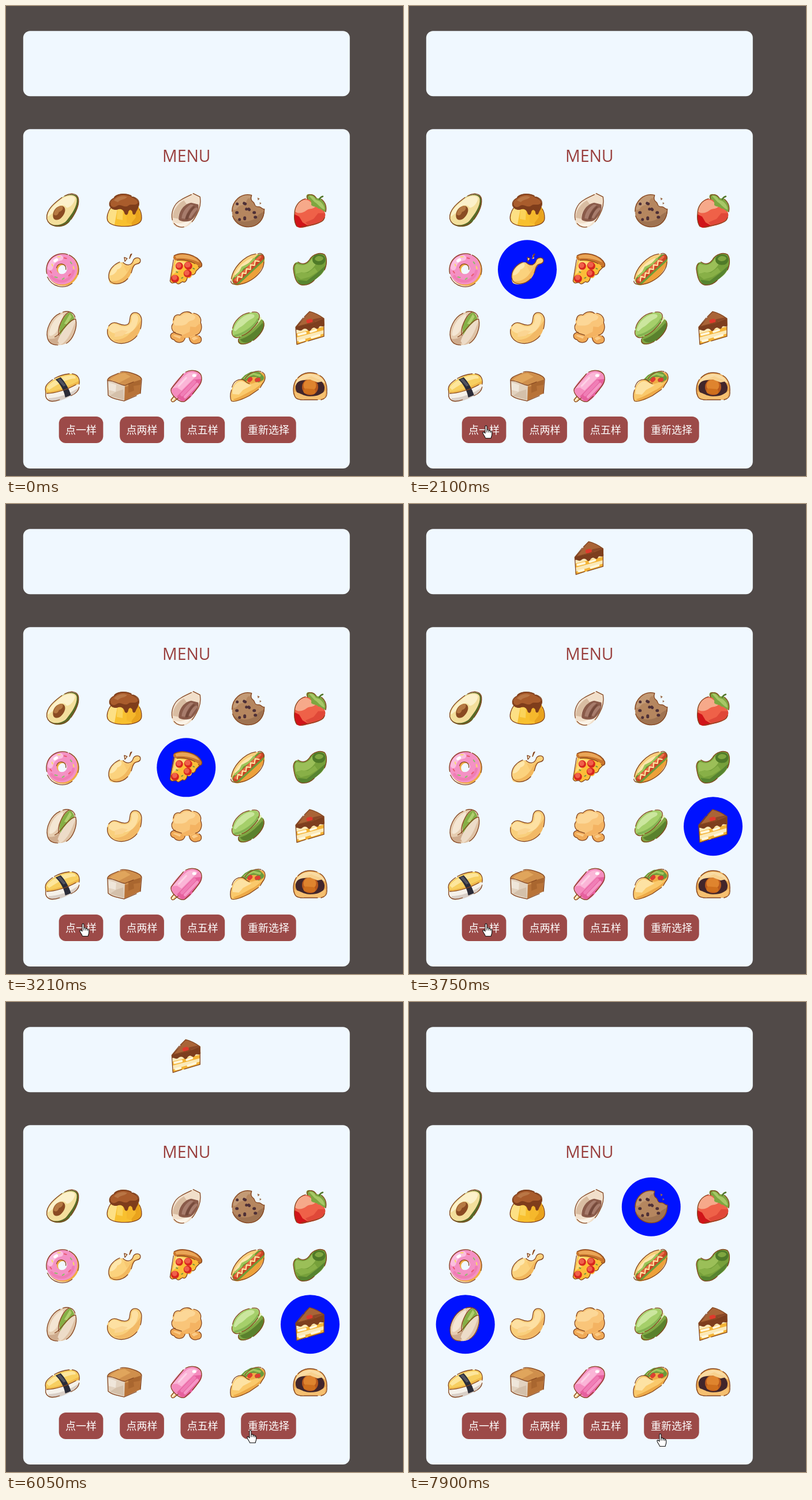
These frames come from a looping animation (688 by 814 pixels, 8 s). An HTML page:

```html
<!DOCTYPE html>
<html lang="zh-CN">
<head>
<meta charset="utf-8">
<title>Menu</title>
<style>
html, body { margin: 0; width: 100%; height: 100%; overflow: hidden; background: #514a48; }
svg { display: block; }
text { text-anchor: middle; }
.title { font: 28.4px "Open Sans", "Noto Sans", sans-serif; fill: #993f3d; }
.label { font: 18px "Noto Sans CJK SC", "Noto Sans CJK", sans-serif; fill: #fff; }
</style>
</head>
<body>
<svg id="stage" width="688" height="814" viewBox="0 0 688 814">
  <g fill="#f0f8ff">
    <rect x="29.8" y="43.2" width="566" height="113" rx="12"/>
    <rect x="29.8" y="213.2" width="566" height="587.8" rx="12"/>
  </g>
  <text class="title" x="312.8" y="270">MENU</text>
</svg>
<script>
// Shapes per dish, joined by "|": "fill path", "stroke:width path", or "o path" for the brown outline.
const DISHES = [
  // avocado
  `586b27 M-27 14C-30 -2 -12 -14 -2 -22C8 -30 26 -32 28 -20C30 -6 20 8 13 18C4 31 -22 32 -27 14Z
  |f3df9c M-27 13C-29 -1 -13 -13 -3 -21C7 -29 24 -30 25 -20C26 -8 16 6 8 16C0 27 -23 29 -27 13Z
  |fcf1cb M-25 10C-26 0 -12 -12 -2 -20C8 -27 21 -27 22 -21C20 -10 8 -2 6 -7C0 -14 -14 -6 -17 4Z
  |8a4b22 M-16 11C-18 0 -8 -11 1 -8C8 -4 4 6 -1 11C-7 18 -15 17 -16 11Z
  |b67942 M-15 6C-14 -3 -6 -10 0 -8C3 -3 -2 1 -6 2C-7 7 -12 10 -15 6Z
  |o M-1 -23C-12 -15 -29 -2 -27 14C-23 29 -2 30 10 20M4 -26C11 -30 26 -33 28 -20C29 -9 22 5 15 15`,
  // pudding
  `f8c02f M-22 -8C-28 0 -31 9 -29 17C-26 24 -12 27 1 27C15 27 30 22 30 13C30 6 28 -2 24 -8Z
  |fde085 M-23 -6C-28 1 -30 9 -28 16C-26 21 -22 23 -17 24L-12 -3Z
  |fbd35a M-12 -3L-13 14L-3 16L-2 -2Z
  |e9a31d M10 0L13 26C24 24 31 20 30 12L24 -7Z|f5b82c M4 0L4 20L11 23L20 11L18 0Z
  |7f3d1b M-25 -9C-26 -17 -21 -20 -17 -24C-10 -31 6 -31 13 -25C21 -22 26 -18 25 -10C25 -4 22 -2 20 3C18 9 14 7 14 2C12 -3 8 -2 7 2C6 9 1 8 0 3C-2 -3 -8 -4 -12 -2C-18 -1 -24 -3 -25 -9Z
  |a95c2c M-24 -11C-24 -18 -20 -20 -15 -23C-9 -29 5 -29 12 -24C18 -21 25 -18 23 -13C18 -8 12 -13 7 -9C0 -4 -6 -13 -12 -9C-17 -5 -22 -6 -24 -11Z
  |b97645 M-18 -18C-12 -26 0 -27 5 -24C2 -19 -8 -20 -11 -15Z
  |o M-20 -21C-28 -16 -26 -8 -23 -6C-29 2 -31 11 -29 17C-25 25 -12 27 1 27C17 27 30 22 30 13C30 7 29 1 26 -3M-17 -24C-10 -31 4 -30 12 -26M15 -24C22 -22 27 -18 25 -9`,
  // brazil nut
  `f1dfca M-24 17C-26 4 -22 -10 -8 -19C2 -24 4 -28 12 -30L24 -24C26 -14 22 2 17 9C10 22 2 29 -7 29C-18 30 -23 25 -24 17Z
  |d9bda2 M-23 12C-24 0 -14 -13 -4 -18L2 -10C-8 -6 -15 4 -13 14Z
  |fbf3e7 M-20 20C-14 24 0 22 12 10C8 20 0 28 -7 28C-14 28 -19 25 -20 20Z
  |8a5b4a M-13 15C-14 0 -2 -13 9 -14L21 -11C23 -2 17 10 9 16C3 20 -11 19 -13 15Z
  |a77c6c M-8 13C-7 2 0 -7 8 -11L13 -10C5 -4 0 5 -2 14ZM4 12C7 3 11 -3 18 -6L20 -3C15 2 11 8 8 13Z
  |74493b M-2 15C0 6 6 -2 13 -8L15 -7C9 0 5 7 3 15Z
  |o M9 -28C-2 -23 -4 -22 -9 -19C-22 -12 -27 4 -24 16M-21 22C-16 28 -8 29 -4 28M12 -30L24 -24C26 -13 23 -2 18 7C15 12 14 15 10 19`,
  // cookie
  `b5865f M6 -27C-12 -32 -29 -17 -28 2C-28 18 -14 28 1 28C17 27 28 15 28 -3C24 -2 23 -8 17 -7C10 -7 12 -13 9 -15C4 -18 5 -24 6 -27Z
  |c39a75 M-4 -27C-18 -24 -26 -12 -26 -2C-18 0 -20 -9 -10 -10C0 -10 -6 -22 3 -22L5 -27Z
  |9f7351 M-25 11C-13 23 8 19 15 10C19 4 25 4 28 0C28 16 17 28 1 28C-11 28 -21 22 -25 11Z
  |4e3037:5 M-19 -12h0M-7 -13l2 1M1 -3l1 1M-20 3h1M-6 12l0 2M12 11h1M-15 15h0M10 3h1M-3 -3h0
  |9a6a48 M16 -23l4 2l-3 3zM20 -15l3 2l-3 2z|o M6 -27C-12 -32 -28 -17 -28 1M-27 9C-22 24 -8 28 1 28C17 27 28 15 28 -3C23 -2 23 -8 17 -7C10 -7 12 -13 9 -15C4 -18 5 -24 6 -27`,
  // strawberry
  `ef6148 M-27 5C-27 -9 -17 -23 -3 -20C8 -18 24 -9 26 5C28 16 18 22 5 25C-5 27 -17 32 -23 27C-28 20 -27 12 -27 5Z
  |f6a98a M-26 1C-25 -12 -14 -22 -3 -18L10 -9C7 -2 -1 -5 -6 -1C-12 4 -21 6 -26 1Z
  |d01419 M-27 6L-19 10L-13 20L-3 26C-12 29 -18 31 -23 27C-27 21 -28 13 -27 6Z
  |e04838 M-3 26L-8 20L6 14L14 4L26 4C28 16 18 22 0 26Z
  |7ea640 M-5 -20C-8 -26 -6 -29 -2 -29C6 -29 9 -26 11 -22L19 -21C26 -15 29 -6 27 2C22 1 20 -4 14 -4C12 -8 6 -6 2 -10C3 -16 0 -20 -5 -20Z
  |a7c766 M-2 -26C4 -27 7 -24 10 -19L16 -17C22 -13 25 -8 25 -2C17 -5 13 -13 8 -15Z|52762b:2.5 M16 -20Q18 -24 22 -25
  |o M-8 -21C-20 -18 -27 -7 -27 5C-28 14 -27 21 -23 27M-15 28C-7 27 0 25 9 23C17 20 23 19 25 12M-4 -20C-9 -30 6 -31 11 -22M20 -20C27 -14 29 -6 27 2`,
  // donut
  `f1ac43:19 M-17 1a18 18 0 1 0 36 0a18 18 0 1 0 -36 0|f491c4:18 M-19 -1a18 18 0 1 0 36 0a18 18 0 1 0 -36 0
  |fbbfdf:9 M-21 -3Q-18 -18 -3 -20|f07db5:5 M-19 12Q-9 24 6 19Q17 14 19 3|fff:5 M-13 -15l3 -2
  |e95a70:2 M3 -20l4 1M-21 3l2 3M11 11l3 -3|8cc06a:2 M14 -13l2 3M-13 13l4 1M0 17l3 -2|f7dc65:2 M19 -5l1 4M-8 -22l4 0M-18 -9l1 3
  |o M9 -26A28 28 0 0 0 -27 7M-26 13A28 28 0 0 0 17 24M12 -25A28 28 0 0 1 27 9M-10 -3a8 8 0 1 1 16 3`,
  // drumstick
  `fbd27d M-27 15C-28 2 -18 -8 -8 -12C-3 -14 1 -10 5 -7C11 -6 14 -10 16 -17C19 -22 28 -21 28 -15C28 -10 22 -10 18 -8C14 -5 14 4 9 12C2 24 -14 28 -22 25C-26 24 -27 20 -27 15Z
  |fee7ad M-25 10C-23 -2 -14 -9 -6 -11C-2 -6 -7 -1 -12 0C-14 6 -20 11 -25 10Z
  |f2b85e M-23 20C-9 22 1 13 6 4C11 -4 14 -9 24 -12C14 -6 14 4 9 12C1 24 -18 28 -23 20Z
  |f8c870 M-1 -7L9 -7L15 -13L18 -11C10 -5 9 1 4 4Z
  |fff0d0 M0 -21l5 2l-4 5zM10 -26l2 7l-4 1z
  |o M-8 -13C-20 -8 -28 2 -27 14C-25 28 -5 28 6 16M0 -21l5 2l-4 5zM11 -26l2 -1l-4 8zM-2 -12C4 -6 13 -6 16 -17C20 -22 28 -21 28 -15C28 -10 22 -10 18 -8C14 -4 14 1 12 6`,
  // pizza
  `fbbd38 M-20 -18L-28 20C-25 27 -21 21 -17 23C-13 28 -11 23 -6 21C-3 24 1 20 2 14C5 17 10 14 10 9C14 11 17 6 17 3L25 -6C15 -15 -4 -20 -20 -18Z
  |fdd978 M-18 -16L-24 9L-12 1L-4 -8L6 -12Z
  |c9752c M-21 -24C-8 -32 20 -26 27 -10C29 -6 26 -2 22 -5C14 -14 -4 -18 -17 -16C-22 -16 -24 -21 -21 -24Z
  |eaa657 M-19 -23C-8 -29 16 -25 23 -12C14 -16 0 -21 -17 -19Z
  |d8251f:13 M-12 -6h0M3 -7l1 1M-20 16l1 0M2 7l1 0|f0604a:9 M-13 -7h0M2 -8l1 0M-20 14h0M1 6h0
  |72963b:2 M-17 4l2 1M12 -2l2 1M-8 15l2 -1
  |o M-22 -17L-28 20C-25 27 -21 21 -17 23C-13 28 -11 23 -6 21C-3 24 1 20 2 14M-21 -24C-8 -32 20 -26 27 -10C28 -5 25 -2 21 -5M23 -3L17 3C16 8 13 10 10 9M-16 -16C-5 -18 9 -14 15 -10`,
  // hot dog
  `eda13a:17 M-19 19Q8 15 20 -14|f9cf7c:16 M-22 15Q-12 -13 15 -19|fde6ac:5 M-21 8Q-11 -10 6 -17
  |6e9c37:15 M-20 19L21 -19|9cc458:4 M-22 12L-14 5L-10 -3L2 -9L10 -18|ca4526:9 M-22 20L23 -21|ea6e46:4 M-22 18L21 -22
  |fdeaa6:2 M-19 20L-18 12L-11 14L-10 6L-4 7L-3 -1L4 0L4 -8L11 -7L12 -15L19 -14
  |o M-29 16C-27 -1 -8 -24 13 -27M17 -27C23 -30 29 -24 27 -18M-27 25C-4 31 29 6 27 -13M-30 20Q-30 24 -26 25`,
  // green bean
  `76a03a M-29 -2C-29 -11 -24 -15 -18 -11C-12 -8 -6 -10 -1 -17C5 -27 17 -30 25 -26C31 -20 29 -7 25 1C21 9 13 14 7 19C0 27 -10 28 -18 26C-26 22 -28 9 -29 -2Z
  |9bbf58 M-26 -2C-26 -11 -22 -10 -17 -8C-8 -6 -1 -11 3 -19L10 -10C5 0 -6 8 -15 5L-25 8Z
  |88b047 M-15 5L-4 6L8 -3L13 4L-1 13L-16 17L-26 9Z|578430 M-22 18L-6 20L11 7L27 -7C25 3 16 12 7 19C0 27 -10 28 -18 26Z
  |4f7a28 M4 -17C4 -25 14 -28 21 -25C30 -21 27 -9 18 -8C9 -7 4 -11 4 -17Z|7fa63f M8 -18C10 -24 19 -25 23 -20C23 -14 11 -12 8 -18Z
  |o M-25 -10C-29 -8 -29 -4 -29 -1C-27 15 -24 25 -14 27C-5 28 2 24 7 19M-21 -13C-12 -7 -6 -10 -1 -17C5 -27 17 -30 25 -26C30 -20 29 -7 25 1`,
  // pistachio
  `e6cdb1 M-26 16C-29 -3 -14 -25 3 -29C13 -31 24 -23 24 -10C25 7 16 29 -6 29C-17 29 -25 25 -26 16Z
  |f4e6d3 M-23 12C-23 -2 -13 -20 1 -25C3 -15 -7 -9 -8 1C-9 7 -19 16 -23 12Z
  |cfac8e M-25 18C-10 21 -2 9 -3 0L5 9C0 20 -4 25 -12 29C-20 28 -24 24 -25 18Z
  |85af45 M-3 12C-10 -4 4 -24 13 -28C18 -25 20 -20 21 -16C12 -11 4 2 -3 12Z|b0cf6e M3 -8L13 -25L16 -20L8 -7Z
  |eddcc8 M-8 22C-4 8 11 -12 23 -15C27 -1 17 27 -4 29Z|dec2a5 M1 26C13 16 18 -1 23 -13C27 3 17 27 -4 29Z
  |o M-4 -26C-20 -19 -29 2 -26 16C-24 26 -16 29 -8 29M-13 15C-3 12 9 -15 23 -16C27 -1 18 20 7 26M1 -28C9 -31 20 -28 22 -19M-6 12C-9 1 0 -22 11 -28`,
  // cashew
  `f9cf7c M-30 7C-31 -6 -20 -13 -10 -8C-3 -5 5 -4 8 -9C11 -16 8 -22 14 -26C22 -30 29 -24 30 -15C30 -3 27 6 22 13C12 26 -4 28 -16 24C-25 21 -29 14 -30 7Z
  |fde0a2 M-27 3C-26 -8 -18 -9 -11 -6C1 1 11 -4 13 -14C13 -20 12 -23 18 -24C25 -24 25 -16 23 -11C20 2 10 11 -3 10C-10 6 -17 13 -27 3Z
  |f2b966 M-19 20C-6 20 3 17 11 7C22 0 26 -12 30 -14C30 -3 27 6 22 13C12 26 -9 27 -19 20Z
  |fbd592 M-16 7L-4 3L6 5L-3 13L-17 15Z
  |o M-29 2C-31 13 -24 22 -14 25C0 29 14 23 22 13M-27 -4C-22 -11 -16 -11 -10 -8C-3 -5 5 -4 8 -9C11 -16 8 -22 14 -26C22 -30 29 -24 30 -15C30 -9 30 -5 28 1`,
  // popcorn
  `f0aa57 M-20 7C-29 8 -29 18 -21 20C-16 27 -4 26 -2 17L5 16C6 24 12 29 20 26C28 25 28 16 22 13L0 2Z
  |f9c579 M-14 10C-24 8 -28 -2 -23 -8C-26 -17 -18 -25 -11 -23C-5 -30 5 -30 9 -26C19 -28 28 -18 25 -10C30 0 25 11 15 12C8 17 -2 19 -6 13C-9 13 -12 12 -14 10Z
  |fcd797 M-20 -5C-24 -14 -17 -22 -9 -21C-3 -28 12 -26 16 -20C14 -11 7 -16 2 -9C-4 -3 -15 -5 -20 -5Z
  |f4b362 M-7 12L6 6L7 -3L16 -2L24 -9C29 1 24 10 15 11C8 16 -2 18 -7 12Z
  |fbcb87 M-23 13C-20 10 -15 13 -9 14L-11 18ZM9 17L15 14L21 17L13 21Z
  |o M-23 -8C-28 -1 -24 8 -14 10L-8 12M-22 -14C-22 -21 -17 -25 -11 -23C-5 -30 5 -30 9 -26M13 -26C22 -25 27 -17 25 -10C29 0 25 10 16 12M-19 7C-30 8 -29 18 -21 20C-16 27 -4 26 -2 17M5 16C6 24 12 29 20 26C28 25 28 16 22 13`,
  // macaron
  `7ea743 M-17 19C-16 10 8 -1 18 -15C27 -18 30 -9 27 -1C22 14 4 26 -8 28C-16 29 -19 24 -17 19Z|5a812d M-14 19C2 15 17 0 25 -10C30 0 21 12 11 19C2 25 -9 28 -14 19Z
  |e6efb7:6 M-21 13Q4 6 20 -17
  |a5cf6a M-28 7C-29 -6 -14 -24 2 -27C14 -30 22 -25 18 -15C12 0 -9 16 -20 16C-26 16 -28 12 -28 7Z
  |cbe69e M-25 3C-22 -11 -10 -21 0 -24C10 -27 15 -21 7 -17C-4 -12 -8 -4 -14 -2C-20 2 -22 8 -25 3Z
  |84b352:4 M-23 13C-8 11 11 -3 17 -15
  |o M-27 0C-25 -12 -12 -25 2 -27M7 -28C18 -30 22 -23 18 -15M-28 4C-30 16 -20 18 -14 15M-17 19C-18 29 -6 29 5 23M9 21C21 12 31 -2 26 -12M-11 13C0 9 12 -3 17 -11`,
  // cake
  `fbe9b8 M-24 -1L24 -15L24 14L-23 28Z|f4b437 M-24 9L24 -3L24 3L-24 16ZM-24 23L24 9V14L-23 28Z
  |fff7dc:4 M-20 11L-8 8M1 6L10 3M-18 22L-10 20M3 16L16 12
  |7d3e1e M-25 -2L-1 -29C8 -26 17 -22 24 -17L25 -5C22 -1 19 -5 16 -3C13 5 9 -2 6 -1C2 -1 1 7 -3 4C-7 -1 -11 0 -14 3C-18 6 -21 1 -25 3Z
  |a96437 M-22 -3L-1 -29C8 -26 17 -22 24 -17L4 -9Z|8a4928 M6 -16L21 -19L24 -17L2 -9L-6 -7Z|df3a2c:7 M-3 -12l4 -1
  |o M-12 -18L-25 -2L-23 28L-8 23M-3 22L24 14V-17C17 -22 8 -27 -1 -29L-10 -20M-22 -3L8 -11`,
  // egg sushi
  `f5f1ea M-29 12C-30 6 0 -10 29 -8C32 -1 29 6 21 11C9 20 -13 27 -24 24C-29 21 -30 16 -29 12Z
  |d9cfc7 M-24 19C-5 19 18 9 29 0C30 6 22 12 15 15C2 23 -17 28 -24 24Z
  |f7cf60 M-30 4C-30 -5 -8 -21 12 -23C26 -24 31 -13 29 -7C17 1 -12 12 -26 11C-29 10 -30 8 -30 4Z
  |fde69c M-27 1C-22 -8 -4 -19 13 -20C20 -21 24 -18 23 -15C8 -15 -13 -2 -23 5Z|efb84a M-27 8C-9 8 11 -2 29 -11V-6C13 2 -13 12 -27 10Z
  |2b2c38 M-12 -13L-3 -17C5 -9 12 4 15 14L5 18C3 6 -4 -6 -12 -13Z|51535f M-9 -13L-4 -15L6 -3L2 -1Z
  |o M-17 -13C-27 -6 -31 -1 -29 7L-29 16C-26 26 -16 26 -5 22M-14 -15C-5 -20 3 -22 12 -23M17 -23C27 -22 31 -14 29 -5M15 15C22 12 28 7 29 0M-27 11C-14 11 10 4 23 -4`,
  // bread
  `b87338 M-1 -3L29 -14L28 11L-1 24Z|cf8f4c M-29 -11C-30 -17 -10 -24 -4 -26C8 -28 31 -20 30 -13C29 -8 9 -2 1 0Z
  |e0a55c M-25 -13C-18 -19 -8 -24 1 -24L11 -18L-10 -7Z|a9662f M7 -6L7 10L17 6L16 -2L28 -4L29 -13Z
  |e2d2bf M-29 -11C-22 -14 -7 -5 1 -3L0 24C-10 23 -22 20 -28 14Z|efe6da M-27 -8L-14 -4L-15 8L-27 5Z|d4c0aa M-14 8L-2 4L-1 22L-25 15Z
  |o M-10 -24C-17 -21 -31 -17 -29 -10L-28 14C-22 20 -10 22 0 24L21 15M-7 -26C2 -29 30 -21 30 -13L28 11M-29 -11C-18 -12 -7 -3 1 -3L16 -9`,
  // popsicle
  `f0c987:8 M-17 16L-23 22|fff0cc:4 M-18 16L-24 22
  |f48cbe M-27 5C-26 -2 -10 -20 -2 -25C8 -32 22 -29 26 -20C30 -10 23 -3 18 4C11 14 4 22 -2 25C-10 29 -28 13 -27 5Z
  |fbb5d7 M-24 2C-15 -7 -5 -19 3 -24C10 -27 18 -25 20 -22L-8 6L-16 1Z|e6609e M-16 16L13 -13L27 -14C28 -6 21 1 15 8C10 15 4 22 -2 25Q-9 26 -16 16Z
  |f07eb6:6 M-7 13L14 -9|f596c5:5 M-2 17L19 -5|fff:5 M13 -20l2 0|fcd2e6:3 M-13 -2L0 -16
  |o M-5 -23L-26 3C-29 12 -12 28 -3 25L7 16M-21 16L-26 22Q-26 27 -21 25L-14 19M-1 -26C10 -32 23 -28 26 -20C29 -10 23 -3 16 6L11 12`,
  // taco
  `f1ac45 M-14 -9C-4 -24 12 -30 24 -25C31 -22 31 -13 26 -8L-10 12Z
  |6c9a3b:9 M-10 -10L-3 -17L6 -22L17 -22L23 -16L16 -12|a1c65d:4 M-6 -15L-1 -19L9 -23L20 -20|dd3f31:7 M2 -12L4 -14M15 -12L18 -13
  |fac96b M-30 24C-33 8 -25 -12 -12 -13C-6 -13 -4 -7 2 -6C10 -5 13 -10 18 -8C22 -6 25 -10 29 -14C28 -2 12 9 2 15C-10 22 -25 28 -30 24Z
  |fde2a3 M-27 12C-28 -2 -19 -11 -11 -10C-4 -8 -1 -4 6 -3L-9 5L-16 13Z|edaa48 M-26 21C-13 18 2 7 10 4C17 -1 22 -5 28 -11C25 -2 10 10 2 15C-10 22 -22 27 -26 21Z
  |o M-29 5C-32 13 -31 21 -29 24C-23 27 -10 21 2 15L18 4M-28 0C-25 -11 -17 -14 -10 -13M-6 -14C2 -25 14 -29 22 -27M24 -26C31 -23 31 -13 25 -6L21 1M-10 -13C-5 -12 -4 -7 2 -6`,
  // yolk pastry
  `e9a751 M-29 5C-30 -12 -17 -25 0 -25C18 -25 30 -12 29 5C30 17 25 22 15 22L-14 22C-25 22 -30 15 -29 5Z
  |f9dba3 M-26 -2C-25 -15 -13 -23 1 -23C15 -23 24 -14 26 -6L14 -13L-12 -13Z
  |42262b M-25 -2C-22 -13 -12 -11 -6 -13C8 -18 23 -13 25 0C26 13 14 17 0 16C-14 19 -27 12 -25 -2Z
  |f5c071 M-27 8C-14 11 -14 15 0 16C15 16 18 12 28 6L25 18L15 22H-15L-25 18Z
  |b9591d:28 M0 0h0|df842e:19 M-2 -3l3 0|cf6f1d:9 M-7 7L5 8|f8d18e M-14 -12L2 -19L22 -10L13 -8L0 -13Z
  |o M-24 -13C-30 -4 -30 9 -27 15C-24 23 -15 22 -8 22H13M-21 -16C-11 -27 3 -26 12 -23M17 -20C26 -15 30 -4 29 8C30 16 27 20 19 22`
];
const BUTTONS = [[91.7, 76.7, "点一样"], [197.2, 76.7, "点两样"], [302.5, 76.7, "点五样"], [407.2, 95.5, "重新选择"]];
const COLS = [97.7, 205, 312.3, 419.7, 527], ROWS = [354.7, 456.3, 558.2, 660];

const LOOP = 8000;
const SERVED = [3750, 7030];
// start, interval, dishes lit at each step
const RUNS = [
  [0, LOOP, [[]]],
  [1640, 111, [0, 12, 8, 4, 6, 10, 18, 3, 11, 2, 17, 14, 4, 9, 7, 16, 8, 13, 19, 14].map(n => [n])],
  [7030, 110, [[2, 12], [16, 18], [9, 15]]],
  [7420, 96, [[1, 13], [7, 19], [0, 11], [4, 17], [5, 16], [3, 10]]]
];
// start, steps, interval, target x, target y
const MOVES = [
  [100, 8, 110, 130, 728], [1000, 1, 110, 131, 727], [1210, 2, 110, 134, 727],
  [4830, 3, 110, 169, 728], [5160, 2, 110, 144, 728], [5500, 3, 110, 320, 750],
  [5830, 3, 110, 424, 742], [6160, 2, 110, 457, 743], [6480, 4, 110, 232, 739],
  [7420, 6, 96, 436, 748]
];

const stage = document.getElementById("stage");
function add(parent, tag, attrs, text) {
  const el = document.createElementNS("http://www.w3.org/2000/svg", tag);
  for (const k in attrs) el.setAttribute(k, attrs[k]);
  if (text) el.textContent = text;
  return parent.appendChild(el);
}
function addDish(n, x, y) {
  const g = add(stage, "g", { transform: `translate(${x} ${y})`, "stroke-linecap": "round", "stroke-linejoin": "round" });
  for (const part of DISHES[n].split("|")) {
    const [, key, d] = part.trim().match(/^(\S+) (.*)$/);
    const [color, width] = (key === "o" ? "85451f:1.3" : key).split(":");
    add(g, "path", width
      ? { d, fill: "none", stroke: "#" + color, "stroke-width": width }
      : { d, fill: "#" + color });
  }
  return g;
}

const lights = DISHES.map((_, n) => {
  const cx = COLS[n % 5], cy = ROWS[Math.floor(n / 5)];
  const light = add(stage, "circle", { cx, cy, r: 51, fill: "#0012ff" });
  addDish(n, cx, cy);
  return light;
});
const served = addDish(14, 312.3, 94.2);

for (const [x, width, label] of BUTTONS) {
  add(stage, "rect", { x, y: 711, width, height: 46, rx: 12, fill: "#9c4a48" });
  add(stage, "text", { class: "label", x: x + width / 2, y: 741 }, label);
}

const pointer = add(stage, "g", { fill: "#fff", stroke: "#111", "stroke-width": 1.1, "stroke-linejoin": "round" });
const hand = add(pointer, "path", { d: "M-2 1.5C-2 -.7 1 -.7 1 1.5V8C1 6.5 4.3 6.5 4.3 8.3V9C4.3 7.7 7.3 7.9 7.3 9.6V10.5C7.5 9.3 9.7 9.5 9.7 11.2V15C9.7 18 8.2 19 8.2 21.5H-1.5C-2 18.5 -5.5 15.5 -6 12.5C-6.3 10.8 -4.3 10.2 -3.3 11.7L-2 13ZM1 8V11.5M4.3 9V11.5M7.3 10.5V12" });
const arrow = add(pointer, "path", { d: "M0 0V17L4 13.2L6.7 19.2L9.2 18.1L6.6 12.4H12Z" });

const show = (el, on) => el.setAttribute("visibility", on ? "visible" : "hidden");

function pointerAt(t) {
  let x = 630, y = 828;
  for (const [start, steps, gap, tx, ty] of MOVES) {
    if (t < start) break;
    const u = Math.min(steps, Math.floor((t - start) / gap) + 1) / steps;
    const e = u * (2 - u);
    x += (tx - x) * e;
    y += (ty - y) * e;
  }
  return [x, y];
}

function draw(t) {
  const [start, gap, picks] = RUNS.filter(r => t >= r[0]).pop();
  const lit = picks[Math.min(picks.length - 1, Math.floor((t - start) / gap))];
  lights.forEach((el, n) => show(el, lit.includes(n)));
  show(served, t >= SERVED[0] && t < SERVED[1]);

  const [x, y] = pointerAt(t);
  const over = y > 711 && y < 757 && BUTTONS.some(([left, w]) => x > left && x < left + w);
  pointer.setAttribute("transform", `translate(${x} ${y})`);
  show(hand, t >= 100 && over);
  show(arrow, t >= 100 && !over);
}

const began = performance.now();
function tick() {
  draw((performance.now() - began) % LOOP);
  requestAnimationFrame(tick);
}
tick();
</script>
</body>
</html>
```
